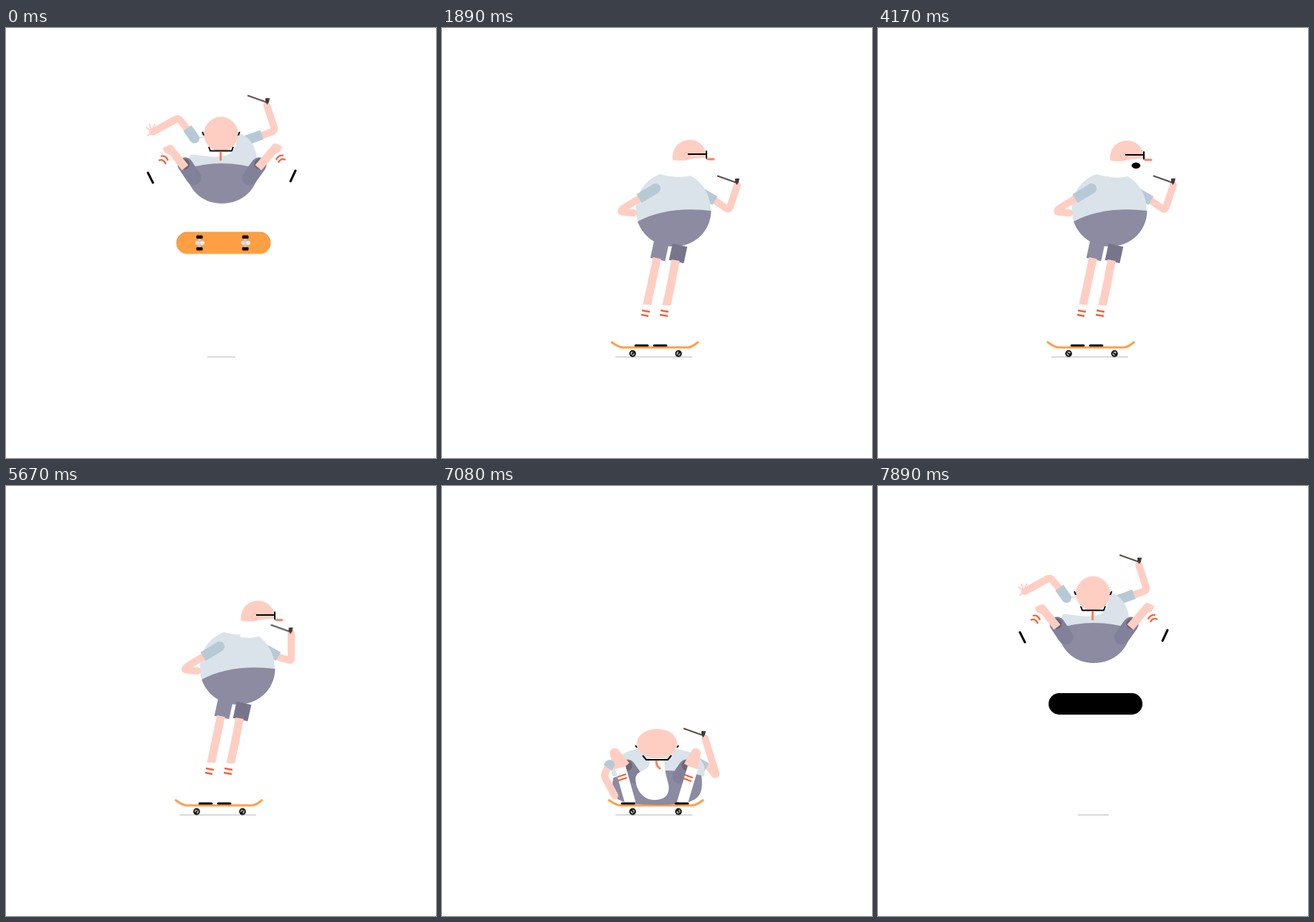
An HTML page without scripts for the animation above (7.92 s loop, 600 px wide and 600 px high).

```html
<!DOCTYPE html>
<html lang="en">
<head>
<meta charset="utf-8">
<title>Skater</title>
<style>
html, body { margin: 0; width: 100%; height: 100%; overflow: hidden; background: #fff; }
svg { display: block; width: 100vw; height: 100vh; }
path { fill: none; stroke-linejoin: round; }
svg * { animation-duration: 7.92s; animation-iteration-count: infinite; animation-timing-function: ease-in-out; }

/* poses: a = air, b = catch, c = cruise, d = crouch; extras per arm */
.m { d: var(--a); animation-name: morph; }
.skin { stroke: #ffcec3; stroke-width: 11.5; }
.knee { animation-name: morph, knee; }
.arm { stroke-width: 10; stroke-linecap: round; }
.sleeve { stroke: #b8c9d6; stroke-width: 14; }
.sock { stroke: #fff; stroke-width: 15; }
.stripe { stroke: #f2603a; stroke-width: 2.3; }
.sole { stroke: #000; stroke-width: 3; stroke-linecap: round; }
.thigh { stroke-width: 21; animation-name: morph, thigh; }
.hem { stroke: #6f6670; stroke-width: 15; stroke-linecap: round; animation-name: morph, front; }
.armL { animation-name: left; }
.armR { animation-name: right; }

@keyframes morph {
  0%, 99.6%, to { d: var(--a); }
  6.9%, 15.8% { d: var(--b); }
  20.45%, 84.6% { d: var(--c); }
  89.4% { d: var(--d); }
  91.5% { d: var(--d); animation-timing-function: cubic-bezier(.2,.6,.4,1); }
}
@keyframes left {
  0%, 99.6%, to { d: var(--a); }
  6.9%, 15.8% { d: var(--b); }
  20.45%, 81% { d: var(--c); }
  85.2% { d: var(--e); }
  89.4% { d: var(--d); }
  91.5% { d: var(--d); animation-timing-function: cubic-bezier(.2,.6,.4,1); }
}
@keyframes right {
  0%, 99.6%, to { d: var(--a); }
  6.9%, 15.8% { d: var(--b); }
  20.45%, 30.7%, 45.5%, 53.5% { d: var(--c); }
  34%, 39.8% { d: var(--m); }
  60.6%, 82% { d: var(--p); }
  89.4%, 91.5% { d: var(--d); }
  94% { d: var(--f); }
}
@keyframes pipe {
  0%, 99.6%, to { transform: translate(0, 0); }
  6.9%, 15.8% { transform: translate(-29.5px, 14px); }
  20.45%, 30.7%, 45.5%, 53.5% { transform: translate(47px, 112px); }
  34%, 39.8% { transform: translate(27px, 95.5px); }
  60.6%, 82% { transform: translate(32.5px, 99.5px); }
  89.4%, 91.5% { transform: translate(0, 244px); }
  94% { transform: translate(103px, 157px); }
}
@keyframes knee {
  0%, 20%, 85%, 99.6%, to { stroke-width: 11.5; }
  6.9%, 15.8% { stroke-width: 12.5; }
  89.4%, 91.5% { stroke-width: 14; }
}
@keyframes thigh {
  0%, 18%, 86%, to { stroke: #82819a; stroke-linecap: round; }
  18.01%, 85.99% { stroke: var(--s); stroke-linecap: butt; }
}
@keyframes front {
  0%, 17.5%, 87%, to { opacity: 1; }
  17.51%, 86.99% { opacity: 0; }
}
@keyframes side {
  0%, 18.5%, 86%, to { opacity: 0; }
  18.51%, 85.99% { opacity: 1; }
}
@keyframes man {
  0%, to { transform: translate(0, 0); animation-timing-function: cubic-bezier(.4,.5,.6,1); }
  6.9% { transform: translate(0, -58px); animation-timing-function: cubic-bezier(.33,0,.67,.33); }
  11.36% { transform: translate(0, 0); animation-timing-function: cubic-bezier(.33,.25,.67,.58); }
  15.8% { transform: translate(-4px, 175px); }
  20.45%, 91.5% { transform: translate(0, 0); }
  99.62% { transform: translate(0, 2px); }
}
@keyframes up {
  0%, 81%, 89.4%, to { transform: translate(0, 0); }
  85.2% { transform: translate(0, -8px); }
}
@keyframes nod {
  0%, 41.67%, 84%, to { transform: translate(0, 0); }
  48%, 53.5% { transform: translate(2px, 1px); }
  60.6%, 79% { transform: translate(6px, 4px); }
}
@keyframes lens {
  0%, 5.5%, 17.5%, to { opacity: 0; }
  5.51%, 17.49% { opacity: 1; }
}
@keyframes mouth {
  0%, 5.5% { transform: translate(324px, 169px) scale(0); }
  6.9%, 15.8% { transform: translate(324px, 169px) scale(1); }
  17%, 19% { transform: translate(332px, 175px) scale(0); }
  20%, 47% { transform: translate(358px, 191px) scale(0); }
  49%, 54.5% { transform: translate(358px, 191px) scale(1.45, 1); }
  56%, to { transform: translate(358px, 191px) scale(0); }
}
@keyframes fingers {
  0%, 99.6%, to { transform: translate(0, 0); opacity: 1; }
  6.9%, 15.8% { transform: translate(79px, 124px); opacity: 0; }
  84%, 91.5% { transform: translate(36px, 287px); opacity: 0; }
  93% { opacity: 1; }
}
@keyframes board {
  0%, to { transform: translate(4px, -146px); animation-timing-function: cubic-bezier(.4,.5,.6,1); }
  6.9% { transform: translate(4px, -233px); animation-timing-function: cubic-bezier(.33,0,.67,.33); }
  11.36% { transform: translate(4px, -175px); animation-timing-function: cubic-bezier(.33,.25,.67,.58); }
  15.8%, 91.9% { transform: translate(0, 0); animation-timing-function: cubic-bezier(.2,.5,.5,1); }
  99.62% { transform: translate(4px, -142px); }
}
@keyframes ride {
  0%, 92.9%, to { opacity: 0; }
  6.9% { opacity: 1; }
}
@keyframes flat {
  0%, 92.9%, to { opacity: 1; }
  6.9% { opacity: 0; }
}
@keyframes flip {
  0%, 2%, 4%, 95%, 97.7%, 99.62%, to { transform: scaleY(1); }
  1%, 3%, 5.3%, 6.9%, 92.9%, 96.4%, 98.7% { transform: scaleY(.1); }
  6% { transform: scaleY(1); }
}
@keyframes belly {
  0%, 3%, 96.4%, to { opacity: 1; }
  1%, 5.3%, 92.9%, 98.7% { opacity: 0; }
}
@keyframes flex {
  0%, 85%, 93%, to { transform: scaleX(1); }
  89.4%, 91.5% { transform: translateX(1.5px) scaleX(1.09); }
}
@keyframes shade {
  0%, to { d: path('M281 459L320 459'); }
  6.9% { d: path('M286 459L315 459'); }
  11.36% { d: path('M276.500 459L324 459'); }
  15.8%, 91.9% { d: path('M242 459L349 459'); }
  99.62% { d: path('M279 459L322 459'); }
}
@keyframes spin { to { transform: rotate(360deg); } }

.man { animation-name: man; }
.up { animation-name: up; }
.head { animation-name: nod; }
.board { animation-name: board; }
.ride { animation-name: ride; animation-timing-function: step-end; }
.flat { animation-name: flat; animation-timing-function: step-end; }
.belly { animation-name: belly; animation-timing-function: step-end; }
.flip, .deck { transform-box: fill-box; transform-origin: center; }
.flip { animation-name: flip; }
.deck { animation-name: flex; }
.hub { transform-box: fill-box; transform-origin: center; animation: spin .42s linear infinite; }
</style>
</head>
<body>
<svg viewBox="0 0 600 600">
  <defs>
    <g id="wheel">
      <circle r="4.700"/>
      <circle class="hub" r="2.100" fill="none" stroke="#fff" stroke-width="1.300" stroke-dasharray="4.400 2.200"/>
    </g>
    <g id="truck">
      <path d="M0 -8V8" stroke="#ccd" stroke-width="3"/>
      <circle cx="-3" r="3" fill="#dcdce2"/><circle cx="4" r="3" fill="#eee"/>
      <rect x="-4.500" y="-10.500" width="9" height="4.500" rx="1.500"/>
      <rect x="-4.500" y="6" width="9" height="4.500" rx="1.500"/>
    </g>
  </defs>

  <path d="M281 459L320 459" stroke="#ccc" stroke-width="1.700" style="animation-name:shade"/>

  <g class="board">
    <g class="ride">
      <path class="deck" d="M237 438.500Q246 445.500 252 445.700H343Q349 445.500 357 438.500" stroke="#ff9f4a" stroke-width="3" stroke-linecap="round"/>
      <use href="#wheel" x="266" y="454.300"/>
      <use href="#wheel" x="330" y="454.300"/>
    </g>
    <g class="flat">
      <g class="flip">
        <rect x="234" y="431" width="131" height="30" rx="15"/>
        <g class="belly">
          <rect x="234" y="431" width="131" height="30" rx="15" fill="#ff9f43" stroke="#ff9f43" stroke-width=".8"/>
          <use href="#truck" x="266" y="446"/>
          <use href="#truck" x="330" y="446"/>
        </g>
      </g>
    </g>
  </g>

  <g class="man">
    <g class="up">
      <path class="m armR skin arm" style="--a:path('M357 150L371 145Q375 143 374 139L364 108');--b:path('M349 188L355 172Q360 160 353 149L336 121');--c:path('M381 241L397 252Q400 254 402 250L412 219');--m:path('M381 240L395 245Q398 246 397 242L392 202');--p:path('M381 239L395 243Q398 244 398 240L398 206');--d:path('M373 393L380 402Q383 404 382 400L367 352');--f:path('M358 290L406 288Q410 288 414 286L466 265')"/>
      <path class="m armR sleeve" style="--a:path('M335 157L357 149');--b:path('M343 198L352 182');--c:path('M362 230L381 241');--m:path('M362 229L381 240');--p:path('M362 228L380 238');--d:path('M350 382L369 393');--f:path('M335 285L362 290')"/>
      <path class="m" style="fill:#dae3ea;--a:path('M266 152Q300 150 325 147C345 153 352 175 350 193L255 193C250 186 266 165 266 152Z');--b:path('M275 193Q300 203 320 189C345 190 367 202 367 235L242 235C242 215 255 197 275 193Z');--c:path('M304 204Q325 210 346 206C363 214 375 232 375 255L273 270C265 243 277 214 304 204Z');--d:path('M272 367Q300 375 328 367C350 371 370 378 366 405L238 405C232 390 245 372 272 367Z')"/>
      <path class="m" style="fill:#8c8ba1;--a:path('M250 197Q301 181 353 197C351 225 330 245 301 245C273 245 253 225 250 197Z');--b:path('M243 234Q303 209 366 232C369 266 355 269 303 269C248 269 236 266 243 234Z');--c:path('M273 270Q315 248 375.5 255C375 284 352 305 323 305C300 305 280 291 273 270Z');--d:path('M239 407Q300 388 362 404C366 437 355 445 300 445C242 445 234 437 239 407Z')"/>
    </g>

    <g>
      <path class="m thigh" style="--s:#77758c;--a:path('M340 209L353 191');--b:path('M337 236L348 219');--c:path('M332 303L327 326');--d:path('M332 405L341 392')"/>
      <path class="m hem" style="--a:path('M354 190l.1 0');--b:path('M350 217l.1 0');--c:path('M327 320l.1 0');--d:path('M342 390l.1 0')"/>
      <path class="m skin knee" style="--a:path('M352 195L376 167L383 171');--b:path('M349 219L362 205L358 224');--c:path('M326 324L320 356L313 388');--d:path('M344 391L354 373L350 395')"/>
      <path class="m sock" style="--a:path('M382 173L399 204');--b:path('M356 222L339 268');--c:path('M313 387L309 440');--d:path('M350 393L335 443')"/>
      <path class="m stripe" style="--a:path('M387 178Q380 177 377 184M390 184Q383 181 380 188');--b:path('M345 233Q350 235 356 238M344 238Q349 240 354 243');--c:path('M305 394Q310 395 316 396M304 400Q309 401 315 402');--d:path('M339 403Q344 405 350 407M337 408Q342 410 348 412')"/>
      <path class="m sole" style="--a:path('M404 199L397 214');--b:path('M332 268L349 268');--c:path('M296 443L313 443');--d:path('M326 443L343 443')"/>
    </g>
    <g>
      <path class="m thigh" style="--s:#8c8ba1;--a:path('M262 209L250 191');--b:path('M272 238L262 226');--c:path('M306 300L301 323');--d:path('M268 405L259 392')"/>
      <path class="m hem" style="--a:path('M249 190l.1 0');--b:path('M258 224l.1 0');--c:path('M301 320l.1 0');--d:path('M258 390l.1 0')"/>
      <path class="m skin knee" style="--a:path('M250 195L229 169L221 173');--b:path('M252 222L241 203L248 226');--c:path('M300 321L293 354L286 387');--d:path('M256 391L241 373L248 395')"/>
      <path class="m sock" style="--a:path('M222 174L205 206');--b:path('M250 224L265 268');--c:path('M286 386L282 440');--d:path('M249 393L263 443')"/>
      <path class="m stripe" style="--a:path('M216 179Q223 177 226 185M213 185Q220 182 223 190');--b:path('M247 235Q253 233 259 231M249 240Q254 238 260 236');--c:path('M279 394Q284 395 290 396M278 400Q283 401 288 402');--d:path('M245 406Q251 404 257 402M246 411Q252 409 258 407')"/>
      <path class="m sole" style="--a:path('M198 202L205 216');--b:path('M253 268L270 268');--c:path('M270 443L287 443');--d:path('M251 443L268 443')"/>
    </g>

    <g class="up">
      <g class="head">
        <path class="m" style="fill:#fff;--a:path('M262 157C258 165 250 172 248 178C265 174 280 182 300 179C318 178 322 165 322 152C310 150 280 150 262 157Z');--b:path('M290 177C285 185 283 190 285 194C292 198 305 199 310 196C322 188 322 180 322 172C310 172 300 175 290 177Z');--c:path('M330 184C325 195 322 203 320 207C330 208 340 208 346 206C365 205 368 195 369 182C355 182 340 185 330 184Z');--d:path('M290 380C292 402 270 393 270 410C272 430 285 438 296 438C314 438 318 428 316 416C313 405 310 395 310 380Z')"/>
        <path class="m" style="fill:#ffcec3;--a:path('M276 148C276 135 287 124 300 124C313 124 324 135 324 148C324 161 313 172 300 172C287 172 276 161 276 148Z');--b:path('M276 170C278 159 287 150 300 150C313 150 322 159 324 168C322 175 318 177 310 177C298 177 286 174 276 170Z');--c:path('M322 184C320 168 331 156 346 156C359 156 370 167 369 181C360 181 352 182 345 183.5C337 186 330 185 322 184Z');--d:path('M272 359C272 348 284 339 300 339C316 339 328 348 328 359C328 371 316 380 300 380C284 380 272 371 272 359Z')"/>
        <circle cx="341" cy="178" r="4.300" fill="none" stroke="#f6b9ad" style="animation-name:side"/>
        <path class="m" stroke="#000" stroke-width="2" style="--a:path('M274 145L276 150M283 166L285 171.5L315 171.5L317 166M324 150L326 145');--b:path('M285 169L296 169M296 169L307 169L317 168L321 168M321 168L322 168');--c:path('M343 176L356 176M356 176L369 176L369 172L369 182M369 182L369 182.5');--d:path('M270 362L272 365M280 376L285 382L315 382L320 376M328 365L330 362')"/>
        <circle cx="312.300" cy="169.800" r="4.800" fill="#fff" stroke="#000" stroke-width="1.500" style="animation-name:lens"/>
        <circle r="4.200" style="animation-name:mouth"/>
        <path class="m" stroke="#ff7f5c" stroke-width="3" stroke-linecap="round" style="--a:path('M299.5 174Q299.5 179 299.5 184');--b:path('M320 175Q327 175 330 169');--c:path('M371 183Q375 183 379 183');--d:path('M299 384Q299 391 304 394')"/>
      </g>
      <g style="animation-name:pipe">
        <path d="M337 94.300L363 103.500" stroke="#5d4c4c" stroke-width="2.200"/>
        <path d="M362 98H368L367 103L364.500 107L362 103Z" style="fill:#41393b"/>
      </g>
      <path class="m armL skin arm" style="--a:path('M254 142L243 129Q240 125 236 128L205 145');--b:path('M257 216L246 228Q235 240 253 251L284 268');--c:path('M277 237L254 251Q246 257 254 257L267 258');--d:path('M231 393L228 400Q226 404 228 408L241 432');--e:path('M268 217L219 206Q215 205 211 204L143 190')"/>
      <path class="m armL sleeve" style="--a:path('M258 147L263 154L253 140');--b:path('M266 210L275 204L257 217');--c:path('M290 229L298 224L275 238');--d:path('M233 390L234 389L231 393');--e:path('M290 222L298 224L266 217')"/>
      <path d="M204 145L196 139M204 145L200 135M204 145L207 135M204 145L198 150" stroke="#ffcec3" stroke-width="2" stroke-linecap="round" style="animation-name:fingers"/>
    </g>
  </g>
</svg>
</body>
</html>
```
